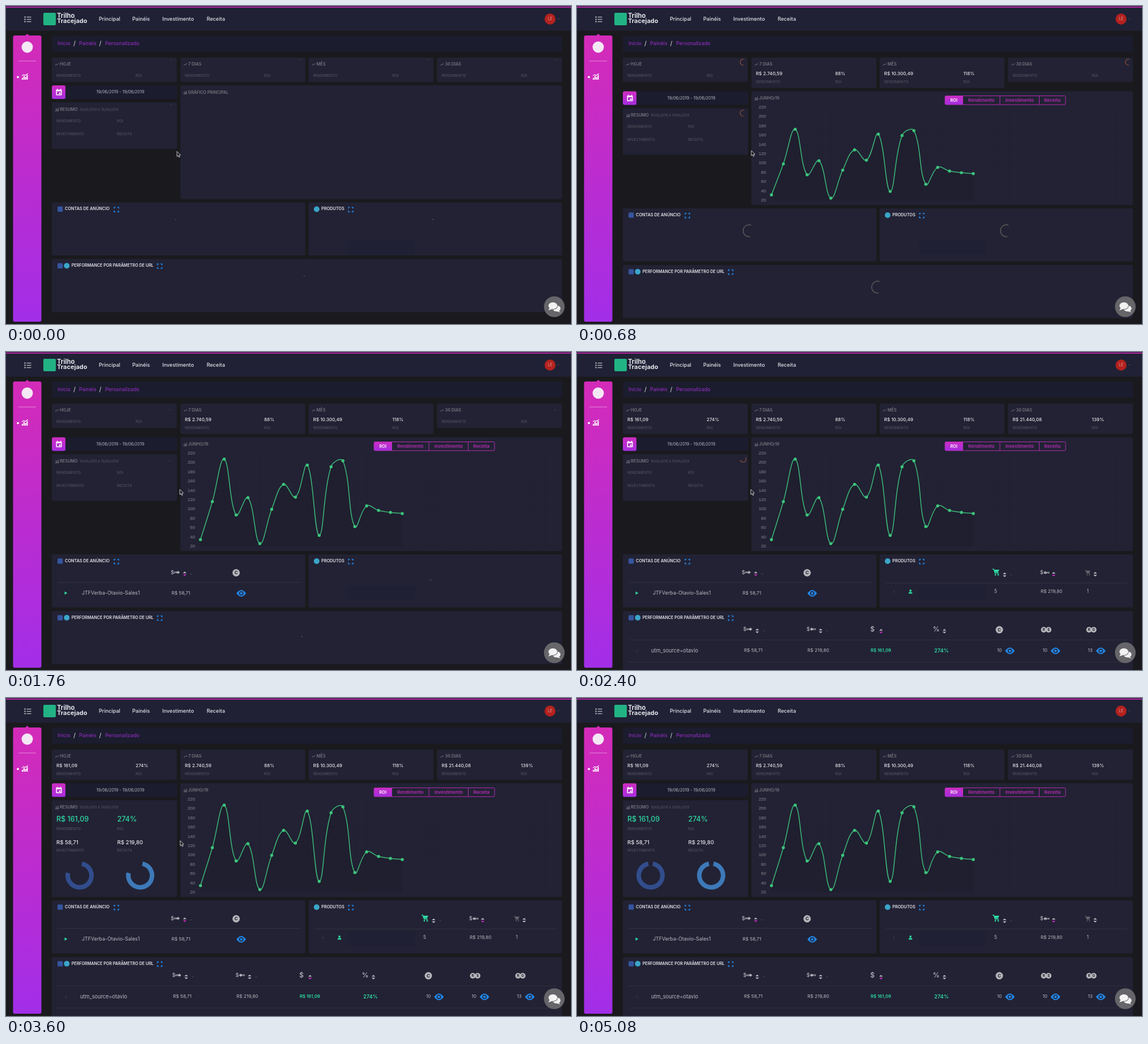
Write an HTML page with a canvas that moves like this. It is 998x561 px and loops after 5.12 s.

```html
<!DOCTYPE html>
<html lang="pt">
<head>
<meta charset="utf-8">
<title>Painel</title>
<style>
html, body { margin: 0; width: 100%; height: 100%; overflow: hidden; background: #1a1a1e; }
canvas { display: block; width: 998px; height: 561px; }
</style>
</head>
<body>
<canvas id="stage" width="998" height="561"></canvas>
<script>
const ctx = document.getElementById('stage').getContext('2d');
const LOOP = 5120, STEP = 40;
const LOAD = { chart: 60, accounts: 1000, rest: 2400, summary: 3200 };
const C = {
  panel: '#222234', bar: '#1b1c2e', white: '#e4e4ea', soft: '#b9b9c2', dim: '#575764', title: '#74747f',
  green: '#2fd9a2', blue: '#2286e6', pink: '#c92cc0', purple: '#9c2fce', line: '#30303f', dark: '#222234'
};
const CHART = { x: 343.5, dx: 20.97, base: 343,
  ys: [331, 264, 189, 287.5, 257, 338, 277.5, 233.5, 256, 199.5, 323.5, 202.5, 192, 308, 271.5, 279.5, 283, 285] };

const clamp = v => Math.min(1, Math.max(0, v));
const easeOut = v => 1 - (1 - clamp(v)) ** 4;

// Linear interpolation through [time, value] pairs.
function track(keys, t) {
  let i = 1;
  while (i < keys.length - 1 && t > keys[i][0]) i++;
  const [t0, a] = keys[i - 1], [t1, b] = keys[i];
  return a + (b - a) * clamp((t - t0) / (t1 - t0));
}

function text(s, x, y, size, color = C.soft, weight = 400, align = 'left', family = 'Inter') {
  ctx.font = `${weight} ${size}px ${family}, sans-serif`;
  ctx.textAlign = align;
  ctx.textBaseline = 'middle';
  ctx.fillStyle = color;
  ctx.fillText(s, x, y);
}
function box(x, y, w, h, color, r = 0) {
  ctx.fillStyle = color;
  ctx.beginPath();
  ctx.roundRect(x, y, w, h, r);
  ctx.fill();
}
function disc(x, y, r, color) {
  ctx.fillStyle = color;
  ctx.beginPath();
  ctx.arc(x, y, r, 0, 7);
  ctx.fill();
}
function poly(points, color) {
  ctx.fillStyle = color;
  ctx.beginPath();
  points.forEach(p => ctx.lineTo(...p));
  ctx.closePath();
  ctx.fill();
}
function stroke(points, color, width = 1) {
  ctx.strokeStyle = color;
  ctx.lineWidth = width;
  ctx.beginPath();
  points.forEach(p => ctx.lineTo(...p));
  ctx.stroke();
}
function arc(x, y, r, from, to, color, width) {
  ctx.strokeStyle = color;
  ctx.lineWidth = width;
  ctx.beginPath();
  ctx.arc(x, y, r, from, to);
  ctx.stroke();
}
function gradient(y0, y1, from = '#d42bb8', to = '#a22ee8') {
  const g = ctx.createLinearGradient(0, y0, 0, y1);
  g.addColorStop(0, from);
  g.addColorStop(1, to);
  return g;
}
const panel = (x, y, w, h) => box(x, y, w, h, C.panel, 2.5);
const label = (s, x, y) => text(s, x, y, 6.5, C.dim);

function trendIcon(x, y) {
  stroke([[x, y + 2], [x + 2, y - .5], [x + 3.5, y + .8], [x + 6, y - 2]], C.title);
}
function barsIcon(x, y, color, k = 1) {
  [2, 4, 3, 5].forEach((h, i) => box(x + i * 1.7 * k, y + (3 - h) * k, 1.2 * k, h * k, color));
  stroke([[x, y - k], [x + 2 * k, y - 2.5 * k], [x + 3.5 * k, y - 1.5 * k], [x + 6.5 * k, y - 3.5 * k]], color, .7 * k);
}
function expandIcon(x, y) {
  for (const sx of [-1, 1]) for (const sy of [-1, 1])
    stroke([[x + sx * 1.6, y + sy * 4], [x + sx * 4, y + sy * 4], [x + sx * 4, y + sy * 1.6]], C.blue, 1.5);
}
function sortIcon(x, y, active) {
  poly([[x - 3.2, y - 1], [x, y - 4], [x + 3.2, y - 1]], C.soft);
  poly([[x - 3.2, y + 1], [x, y + 4], [x + 3.2, y + 1]], active ? C.pink : C.soft);
}
function moneyIcon(x, y, dir) {
  text('$', x, y, 9, C.soft, 500);
  const tail = x + 11 - dir * 4.5;
  [0, 2].forEach(d => box(tail + dir * d - .5, y - 1.5, 1.2, 3, C.soft));
  box(Math.min(tail + dir * 3.4, tail + dir * 6), y - 1.5, 2.6, 3, C.soft);
  poly([[tail + dir * 6, y - 3], [tail + dir * 9.5, y], [tail + dir * 6, y + 3]], C.soft);
}
function coin(x, y, r, letter) {
  disc(x, y, r, '#b6b6bb');
  text(letter, x, y + .3, r * 1.25, C.dark, 700, 'center');
}
function eye(x, y) {
  ctx.fillStyle = C.blue;
  ctx.beginPath();
  ctx.moveTo(x - 8.5, y);
  ctx.quadraticCurveTo(x, y - 11.5, x + 8.5, y);
  ctx.quadraticCurveTo(x, y + 11.5, x - 8.5, y);
  ctx.fill();
  disc(x, y, 3.8, C.panel);
  disc(x, y, 2.3, C.blue);
}
function cart(x, y, color, k) {
  stroke([[x - 6 * k, y - 5 * k], [x - 4 * k, y - 5 * k], [x - 1.5 * k, y + 2 * k], [x + 5 * k, y + 2 * k]], color, 1.3 * k);
  poly([[x - 3.5 * k, y - 4 * k], [x + 6 * k, y - 4 * k], [x + 3.5 * k, y + .8 * k], [x - 2 * k, y + .8 * k]], color);
  disc(x - 1 * k, y + 5 * k, 1.4 * k, color);
  disc(x + 4 * k, y + 5 * k, 1.4 * k, color);
}
function chevron(x, y) {
  stroke([[x - 1, y - 2], [x + 1, y], [x - 1, y + 2]], '#45454f');
}
const moreDot = (x, y) => box(x - 1.5, y, 3, 1, '#4a4a55');

function spinner(x, y, r, color, width, t) {
  const period = 1755, turns = Math.floor(t / period) * 617, u = t % period;
  const tail = track([[0, 240], [680, 440], [1240, 610], [period, 857]], u) + turns;
  const head = track([[0, 252], [680, 650], [1240, 800], [period, 869]], u) + turns;
  arc(x, y, r, tail * Math.PI / 180, head * Math.PI / 180, color, width);
}
const smallSpinner = (x, y, t) => spinner(x, y, 5.3, '#96523d', 1.1, t);
const bigSpinner = (x, y, t) => spinner(x, y, 10.5, '#625b5c', 1.3, t);

function drawFrame() {
  box(0, 0, 998, 561, '#1a1a1e');
  box(0, 0, 998, 43.5, '#202135');
  box(0, 1, 998, 2, '#b0269f');
  [19.5, 23.5, 27.5].forEach(y => {
    disc(33.5, y, 1.2, C.soft);
    box(36.5, y - .6, 8, 1.3, C.soft);
  });
  box(66, 12, 22, 22, '#22b384', 2);
  text('Trilho', 90, 17.5, 11.2, C.white, 700);
  text('Tracejado', 90, 27, 11, C.white, 700);
  [['Principal', 164], ['Painéis', 223], ['Investimento', 276], ['Receita', 354.5]]
    .forEach(([s, x]) => text(s, x, 23.3, 9.1, C.white, 500));
  disc(961, 23, 9.7, '#b3221f');
  text('LE', 961, 23.3, 7, '#e0a09c', 400, 'center');
  box(974.5, 22, 3, 1, '#4a4a55');

  poly([[33, 53], [37.5, 49], [42, 53]], '#d42bb8');
  box(12.5, 52, 50, 505, gradient(52, 557), 3);
  disc(37.5, 72.5, 10, '#f4e8f5');
  box(22, 96.5, 31, 1, 'rgba(255,255,255,.45)');
  disc(21, 125.3, 1.9, '#fff');
  barsIcon(28, 125, '#fff', 1.65);

  box(81, 52, 901, 28.5, C.bar, 3);
  text('Início', 91, 66.5, 9.1, C.purple);
  text('/', 119, 66.5, 11, C.white);
  text('Painéis', 129, 66.5, 9.1, C.purple);
  text('/', 164.5, 66.5, 11, C.white);
  text('Personalizado', 175, 66.5, 9.1, C.purple);
}

function drawCard(x, title, value, roi, loaded, t) {
  panel(x, 91, 220.5, loaded ? 53.5 : 43);
  trendIcon(x + 6, 103);
  text(title, x + 14, 102.8, 7.3, C.title, 600);
  const y = loaded ? 133.7 : 123;
  label('RENDIMENTO', x + 8, y);
  label('ROI', x + 148, y);
  if (loaded) {
    text(value, x + 8, 120, 8.1, C.white, 500);
    text(roi, x + 148, 120, 8, C.white, 500);
  } else smallSpinner(x + 212.5, 99, t);
}

function drawSummary(s, t) {
  box(81, 140 + s, 221, 24, C.bar, 3);
  box(81, 140 + s, 24, 24, gradient(140 + s, 164 + s, '#cf2dc0', '#a62ee0'), 3);
  box(88.5, 147.5 + s, 10, 10, '#fff', 1);
  box(90, 150.5 + s, 7, 5.5, '#b72ed0');
  box(93.7, 152.7 + s, 2.6, 2.6, '#fff');
  box(90, 146 + s, 1.2, 2, '#fff');
  box(96, 146 + s, 1.2, 2, '#fff');
  text('19/06/2019 - 19/06/2019', 202, 152.3 + s, 7.3, C.soft, 400, 'center');

  const loaded = t >= LOAD.summary;
  panel(81, 170 + s, 221, loaded ? 170.5 : 82);
  barsIcon(87, 183 + s, C.title, .95);
  text('RESUMO', 95, 182.7 + s, 7.3, C.title, 600);
  text('19/06/2019 A 19/06/2019', 130, 183 + s, 5.8, C.dim);
  const [y1, y2] = loaded ? [231, 268.7] : [202.7 + s, 226 + s];
  label('RENDIMENTO', 89, y1);
  label('ROI', 196, y1);
  label('INVESTIMENTO', 89, y2);
  label('RECEITA', 196, y2);
  if (!loaded) return smallSpinner(293.5, 178.5 + s, t);
  text('R$ 161,09', 89, 214.5, 12.5, C.green, 500);
  text('274%', 196.5, 214.5, 12.5, C.green, 500);
  text('R$ 58,71', 89, 254.7, 9.6, C.white, 500);
  text('R$ 219,80', 196.5, 254.7, 9.6, C.white, 500);
  const sweep = easeOut((t - LOAD.summary) / 1200) * (2 * Math.PI - .38);
  const start = -Math.PI / 2 + .19;
  arc(130, 313, 21, start, start + sweep, '#324d8c', 8);
  arc(237, 313, 21, start, start + sweep, '#3d79b8', 8);
}

// Smooth path whose control points depend on the distance to both neighbours.
function splinePath(pts) {
  const tension = .4;
  const handles = pts.map((p, i) => {
    const a = pts[Math.max(0, i - 1)], b = pts[Math.min(pts.length - 1, i + 1)];
    const before = Math.hypot(p[0] - a[0], p[1] - a[1]), after = Math.hypot(b[0] - p[0], b[1] - p[1]);
    const move = k => [p[0] + k * (b[0] - a[0]), Math.min(CHART.base, p[1] + k * (b[1] - a[1]))];
    return [move(-tension * before / (before + after)), move(tension * after / (before + after))];
  });
  ctx.beginPath();
  ctx.moveTo(...pts[0]);
  for (let i = 1; i < pts.length; i++)
    ctx.bezierCurveTo(...handles[i - 1][1], ...handles[i][0], ...pts[i]);
}

function drawChart(s, t) {
  panel(308, 140 + s, 674, 200.5);
  barsIcon(313.5, 153 + s, C.title, .95);
  const loaded = t >= LOAD.chart;
  text(loaded ? 'JUNHO/19' : 'GRÁFICO PRINCIPAL', 321.5, 152.7 + s, 7.2, C.title, 600);
  if (!loaded) return;

  for (let v = 20; v <= 220; v += 20) {
    const y = CHART.base - (v - 20) * .8225;
    text(v, 334, y, 8, '#85858f', 400, 'right', '"Liberation Sans"');
    box(343, y, 629, .6, 'rgba(0,0,0,.06)');
  }
  for (let i = 0; i < 31; i++) box(CHART.x + i * CHART.dx, 178, .6, 165, 'rgba(0,0,0,.06)');

  const edges = [650, 681.5, 747, 816.5, 863];
  box(650, 158.5, 31.5, 15.5, gradient(158, 174, '#cf2dc4', '#a22ee0'), 2);
  ctx.strokeStyle = '#b52bb4';
  ctx.lineWidth = 1;
  ctx.beginPath();
  ctx.roundRect(650, 158.5, 213, 15.5, 2);
  ctx.stroke();
  edges.slice(1, 4).forEach(x => stroke([[x, 158.5], [x, 174]], '#b52bb4'));
  ['ROI', 'Rendimento', 'Investimento', 'Receita'].forEach((s, i) =>
    text(s, (edges[i] + edges[i + 1]) / 2, 166.7, i ? 8 : 7.3, i ? '#b52bb4' : '#fff', 600, 'center'));

  const grow = easeOut((t - LOAD.chart) / 1800);
  const pts = CHART.ys.map((y, i) => [CHART.x + i * CHART.dx, CHART.base - (CHART.base - y) * grow]);
  splinePath(pts);
  ctx.lineTo(pts[17][0], CHART.base);
  ctx.lineTo(CHART.x, CHART.base);
  ctx.fillStyle = 'rgba(22,22,26,.2)';
  ctx.fill();
  splinePath(pts);
  ctx.strokeStyle = '#3db878';
  ctx.lineWidth = 1.5;
  ctx.stroke();
  pts.forEach(p => disc(...p, 2.7, '#3cc47c'));
}

function drawAccounts(s, t) {
  panel(81, 346.5 + s, 447.5, 93.5);
  box(91, 353.7 + s, 9.3, 9.3, '#35569f', 1.5);
  text('CONTAS DE ANÚNCIO', 104, 358.2 + s, 7.3, C.white, 600);
  expandIcon(195, 359.2 + s);
  if (t < LOAD.accounts) return bigSpinner(304, 386 + s, t);
  moneyIcon(291, 388.8, 1);
  sortIcon(315.7, 391.3, true);
  moreDot(327, 391);
  coin(406.5, 389.5, 6.5, 'C');
  box(91, 406, 430, 1, C.line);
  poly([[103.5, 422.5], [108.5, 425.3], [103.5, 428]], C.green);
  text('JTFVerba-Otavio-Sales1', 134, 425.5, 8.9);
  text('R$ 58,71', 292.5, 425.5, 8.2);
  eye(415.5, 425.7);
}

function drawProducts(s, t) {
  panel(534.5, 346.5 + s, 447.5, 93.5);
  disc(548.7, 358.5 + s, 5, '#3aa5c9');
  text('PRODUTOS', 557, 358.2 + s, 7.3, C.white, 600);
  expandIcon(609, 359.2 + s);
  if (t < LOAD.rest) bigSpinner(758.5, 386 + s, t);
  else {
    cart(740, 388, C.green, 1);
    sortIcon(755.3, 393);
    moreDot(767, 392.5);
    moneyIcon(818, 389.3, -1);
    sortIcon(842, 392, true);
    cart(902, 389, '#66666d', .8);
    sortIcon(915.3, 392);
    box(545, 407, 427, 1, C.line);
    chevron(560, 423);
    disc(589, 421, 1.9, C.green);
    box(585.7, 423.4, 6.6, 2.8, C.green, [2, 2, 0, 0]);
    text('5', 737, 422.7, 8.3);
    text('R$ 219,80', 819, 422.7, 8.2);
    text('1', 900.5, 422.7, 8.3);
  }
  box(604, 412.5, 118, 25, '#1f2033');
}

function drawPerformance(s, t) {
  const loaded = t >= LOAD.rest;
  panel(81, 446.5 + s, 901, loaded ? 110 : 93.5);
  box(91, 453.7 + s, 9.3, 9.3, '#35569f', 1.5);
  disc(107.3, 458.3 + s, 5, '#3aa5c9');
  text('PERFORMANCE POR PARÂMETRO DE URL', 115.7, 458 + s, 7.15, C.white, 600);
  expandIcon(271.5, 459 + s);
  if (!loaded) return bigSpinner(531, 485.5 + s, t);
  moneyIcon(293.5, 489, 1);
  moneyIcon(405.5, 489, -1);
  [318.3, 430.3].forEach(x => {
    sortIcon(x, 492);
    moreDot(x + 11.5, 491.5);
  });
  text('$', 518, 489, 12, C.soft, 500);
  sortIcon(537, 492.5, true);
  text('%', 628.5, 489, 12, C.soft, 500);
  sortIcon(649, 492.5);
  coin(746, 490, 6.5, 'C');
  coin(824.5, 490, 5, 'R');
  coin(833, 490, 5, '$');
  coin(904.5, 490, 5, 'R');
  coin(912.7, 490, 5, 'G');
  box(91, 507.5, 881, 1, C.line);
  chevron(106, 527.5);
  text('utm_source=otavio', 131, 527, 9.2);
  text('R$ 58,71', 295, 527, 8.2);
  text('R$ 219,80', 407, 527, 8.2);
  text('R$ 161,09', 518.7, 527, 7.8, C.green, 600);
  text('274%', 631, 527, 9.2, C.green, 600);
  [['10', 742], ['10', 822.5], ['13', 902.5]].forEach(([s, x]) => {
    text(s, x, 527, 8.2);
    eye(x + 22.7, 527.3);
  });
  box(91, 546.5, 881, 1, C.line);
}

function drawChat() {
  disc(968.5, 530.5, 18.3, '#66666a');
  const bubble = (x, y, rx, ry, color) => {
    ctx.fillStyle = color;
    ctx.beginPath();
    ctx.ellipse(x, y, rx, ry, 0, 0, 7);
    ctx.fill();
  };
  bubble(972.5, 533.5, 7, 5.3, '#f2f2f2');
  poly([[975, 536], [979.5, 540.5], [971, 538]], '#f2f2f2');
  bubble(966, 529, 8.6, 6.8, '#66666a');
  bubble(966, 528.8, 7.8, 6, '#f2f2f2');
  poly([[961, 531], [958, 537], [966, 534]], '#f2f2f2');
}

function drawCursor(t) {
  if (t >= 4720) return;
  const x = track([[0, 302], [160, 302], [400, 308], [1400, 308], [1640, 307], [3520, 307], [3840, 310]], t);
  const y = track([[0, 256.5], [160, 256.5], [400, 255], [1400, 255], [1640, 242.5], [3520, 242.5], [3840, 279]], t);
  const shape = [[0, 0], [0, 9], [2, 7.2], [3.6, 10.4], [5, 9.7], [3.6, 6.6], [6.3, 6.3], [0, 0]]
    .map(([dx, dy]) => [x + dx, y + dy]);
  poly(shape, '#15151a');
  stroke(shape, '#dcdce0', .9);
}

function render(t) {
  const shift = t >= LOAD.chart ? 10.5 : 0, rest = t >= LOAD.rest;
  drawFrame();
  drawCard(81, 'HOJE', 'R$ 161,09', '274%', rest, t);
  drawCard(308, '7 DIAS', 'R$ 2.740,59', '88%', shift > 0, t);
  drawCard(534.5, 'MÊS', 'R$ 10.300,49', '118%', shift > 0, t);
  drawCard(761.5, '30 DIAS', 'R$ 21.440,08', '139%', rest, t);
  drawSummary(shift, t);
  drawChart(shift, t);
  drawAccounts(shift, t);
  drawProducts(shift, t);
  drawPerformance(shift, t);
  drawChat();
  drawCursor(t);
}

function tick() {
  render(Math.floor(performance.now() % LOOP / STEP) * STEP);
  requestAnimationFrame(tick);
}
tick();
</script>
</body>
</html>
```
